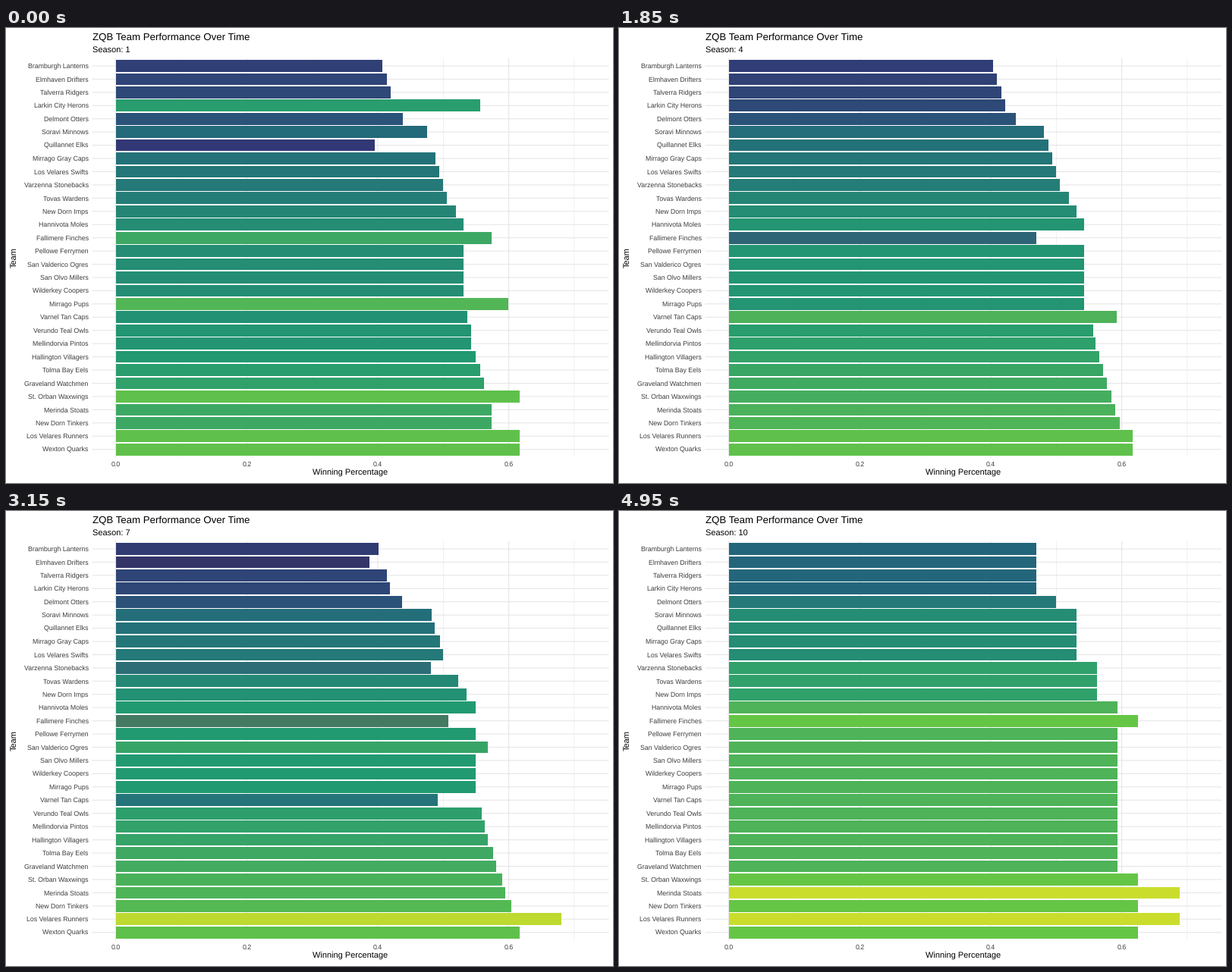
Animation of 800 by 600 pixels, one loop 5000 ms. Source, as a matplotlib script:

```python
import matplotlib.pyplot as plt
import numpy as np
from matplotlib.animation import FuncAnimation

plt.rcParams["font.family"] = "Liberation Sans"
plt.rcParams["text.hinting"] = "none"

W, H, DPI = 800, 600, 100
FRAMES, INTERVAL = 100, 50

# Panel geometry in pixels, y pointing down
LEFT, RIGHT, TOP, BOTTOM = 113.5, 794.5, 39.5, 566.1
X0, X_UNIT = 144.6, 863.4
ROW0, ROW_STEP = 49.965, 17.4381

TEAMS = [
    "Bramburgh Lanterns", "Elmhaven Drifters", "Talverra Ridgers",
    "Larkin City Herons", "Delmont Otters", "Soravi Minnows",
    "Quillannet Elks", "Mirrago Gray Caps", "Los Velares Swifts",
    "Varzenna Stonebacks", "Tovas Wardens", "New Dorn Imps",
    "Hannivota Moles", "Fallimere Finches", "Pellowe Ferrymen",
    "San Valderico Ogres", "San Olvo Millers", "Wilderkey Coopers",
    "Mirrago Pups", "Varnel Tan Caps", "Verundo Teal Owls",
    "Mellindorvia Pintos", "Hallington Villagers", "Tolma Bay Eels",
    "Graveland Watchmen", "St. Orban Waxwings", "Merinda Stoats",
    "New Dorn Tinkers", "Los Velares Runners", "Wexton Quarks",
]

# Typical strength rises down the list, in wins per full season
FULL, BEST = 162, 100
strength = np.interp(np.arange(len(TEAMS)),
                     [0, 3, 4, 5, 9, 12, 18, 27, 29],
                     [65, 68, 71, 78, 82, 88, 88, 97, BEST])

# Season: (games played, shift of the field, spread below the best)
SEASONS = {
    1: (FULL, -4, .85), 2: (FULL, -2, 1), 3: (FULL, -2, .85),
    4: (FULL, 0, 1), 5: (FULL, -1, .95), 6: (60, 3, 1.25),
    7: (FULL, 0, .95), 8: (FULL, 0, 1), 10: (32, 3.2, .78),
}

# Seasons in which a team breaks clearly from its usual strength
SWINGS = {
    "Elmhaven Drifters": {6: 49},
    "Larkin City Herons": {1: 90, 2: 83},
    "Quillannet Elks": {1: 64},
    "Varzenna Stonebacks": {2: 69, 3: 93, 6: 65},
    "Fallimere Finches": {1: 93, 2: 68, 3: 68, 4: 83, 5: 64, 6: 54, 7: 93, 8: 93, 10: 101},
    "San Valderico Ogres": {6: 100},
    "Mirrago Pups": {1: 97, 2: 95, 3: 80, 8: 81},
    "Varnel Tan Caps": {4: 100, 6: 81, 7: 79, 8: 82},
    "St. Orban Waxwings": {1: 100},
    "Merinda Stoats": {2: 84, 3: 82, 8: 108, 10: 111},
    "Los Velares Runners": {6: 116, 7: 108, 10: 111},
}


def season_shares(season):
    games, shift, spread = SEASONS[season]
    wins = BEST + shift - spread * (BEST - strength)
    wins[-2:] = BEST
    for team, swing in SWINGS.items():
        row = TEAMS.index(team)
        wins[row] = swing.get(season, wins[row])
    return np.round(np.round(wins * games / FULL) / games, 3)


seasons = list(SEASONS)
shares = np.array([season_shares(s) for s in seasons])

# Colour: blended in Lab, shown in a display space with gamma 1.8
SRGB_D65 = np.array([[.4124, .3576, .1805], [.2126, .7152, .0722], [.0193, .1192, .9505]])
SRGB_D50 = np.array([[.4361, .3851, .1431], [.2225, .7169, .0606], [.0139, .0971, .7141]])
DISPLAY = np.array([[.4543, .3533, .1566], [.2426, .6744, .0834], [.0148, .0904, .7195]])
TO_DISPLAY = np.linalg.inv(DISPLAY) @ SRGB_D50
WHITE = SRGB_D65.sum(axis=1)
STOPS = ["#440154", "#414487", "#2A788E", "#22A884", "#7AD151", "#FDE725"]


def hex_to_lab(code):
    rgb = np.array([int(code[i:i + 2], 16) for i in (1, 3, 5)]) / 255
    lin = np.where(rgb > .04045, ((rgb + .055) / 1.055) ** 2.4, rgb / 12.92)
    t = SRGB_D65 @ lin / WHITE
    x, y, z = np.where(t > .008856, np.cbrt(t), 7.787 * t + 16 / 116)
    return np.array([116 * y - 16, 500 * (x - y), 200 * (y - z)])


def lab_to_display(lab):
    y = (lab[..., 0] + 16) / 116
    f = np.stack([y + lab[..., 1] / 500, y, y - lab[..., 2] / 200], axis=-1)
    xyz = np.where(f > .2069, f ** 3, (f - 16 / 116) / 7.787) * WHITE
    lin = xyz @ np.linalg.inv(SRGB_D65).T
    return np.clip(lin @ TO_DISPLAY.T, 0, 1) ** (1 / 1.8)


stop_labs = np.array([hex_to_lab(c) for c in STOPS])
level = (shares - shares.min()) / (shares.max() - shares.min())
stop_pos = np.linspace(0, 1, len(STOPS))
labs = np.stack([np.interp(level, stop_pos, stop_labs[:, c]) for c in range(3)], axis=-1)
GRID = lab_to_display(hex_to_lab("#EBEBEB"))
AXIS_TEXT = lab_to_display(hex_to_lab("#4D4D4D"))


def pt(px):
    return px * 72 / DPI


fig = plt.figure(figsize=(W / DPI, H / DPI), dpi=DPI, facecolor="white")
ax = fig.add_axes([0, 0, 1, 1])
ax.axis("off")


def line(xs, ys, width):
    ax.plot(xs, ys, color=GRID, lw=pt(width), solid_capstyle="butt", snap=False, zorder=1)


def label(x, y, text, size, color="black", **kw):
    return ax.text(x, y, text, fontsize=pt(size), color=color, va="baseline", **kw)


rows = ROW0 + ROW_STEP * np.arange(len(TEAMS))
for tenth in range(8):
    x = X0 + X_UNIT * tenth / 10
    major = tenth % 2 == 0
    line([x, x], [TOP, BOTTOM], 1.07 if major else .53)
    if major:
        label(x, 578.2, f"{tenth / 10:.1f}", 8.8, AXIS_TEXT, ha="center")
for y, team in zip(rows, TEAMS):
    line([LEFT, RIGHT], [y, y], 1.07)
    label(108.7, y + 3.1, team, 8.8, AXIS_TEXT, ha="right")

label(LEFT, 16, "ZQB Team Performance Over Time", 13.2)
subtitle = label(LEFT, 32, "", 11)
label((LEFT + RIGHT) / 2, 590.2, "Winning Percentage", 11, ha="center")
label(13.5, 303, "Team", 11, ha="center", rotation=90, rotation_mode="anchor")

bars = ax.barh(rows, shares[0] * X_UNIT, height=.9 * ROW_STEP, left=X0, linewidth=0, zorder=2)
ax.set_xlim(0, W)
ax.set_ylim(H, 0)


def blend(keys, t):
    i = min(np.searchsorted(seasons, t, side="right") - 1, len(seasons) - 2)
    part = (t - seasons[i]) / (seasons[i + 1] - seasons[i])
    return keys[i] + (keys[i + 1] - keys[i]) * part


def update(frame):
    t = 1 + 9 * frame / (FRAMES - 1)
    subtitle.set_text(f"Season: {round(t)}")
    colors = lab_to_display(blend(labs, t))
    for bar, share, color in zip(bars, blend(shares, t), colors):
        bar.set_width(share * X_UNIT)
        bar.set_facecolor(color)
    return [subtitle, *bars]


anim = FuncAnimation(fig, update, frames=FRAMES, interval=INTERVAL, repeat=True, repeat_delay=0)
plt.show()
```
